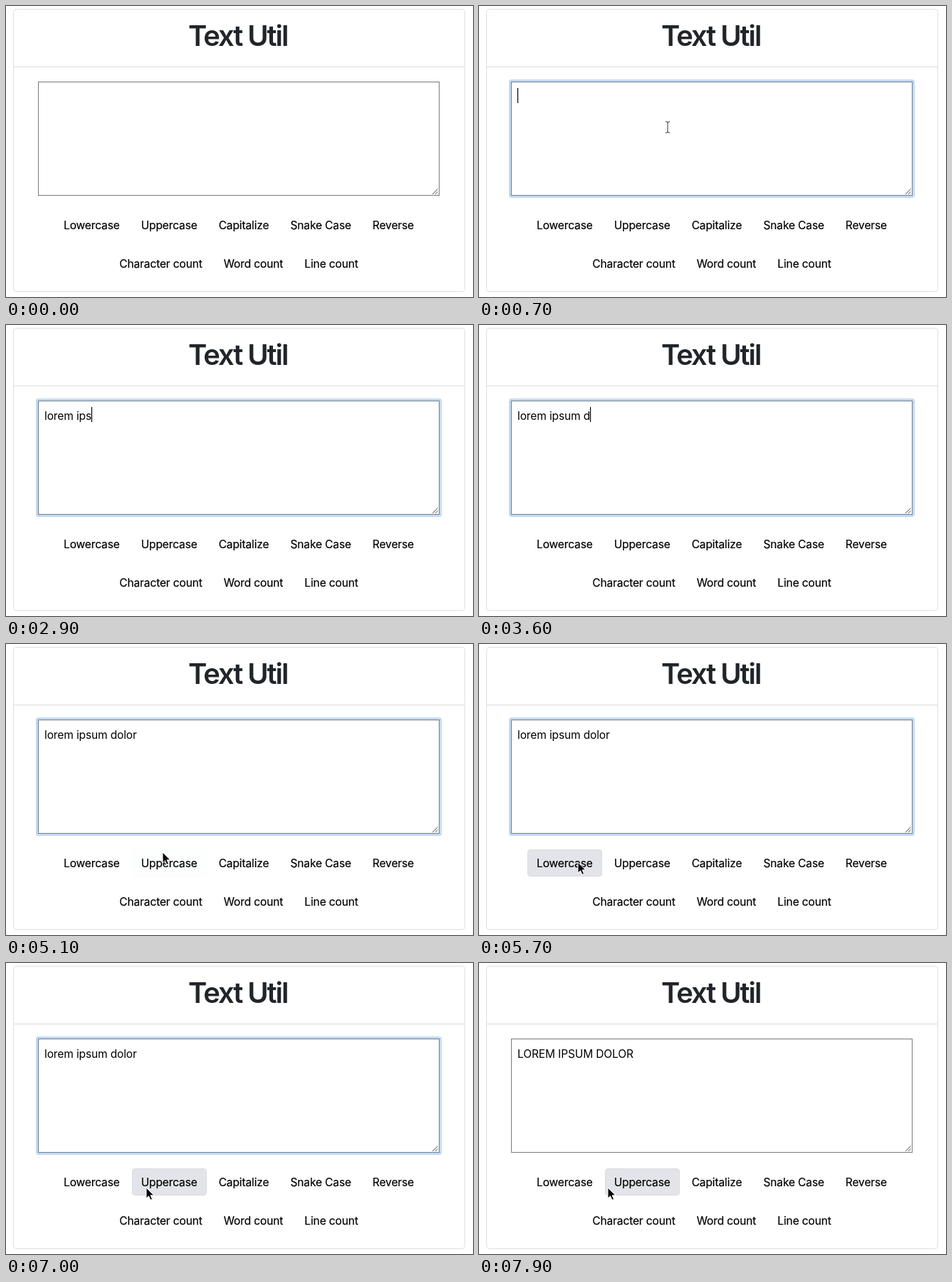
An HTML page for the animation above (8 s loop, 656x408 px).

```html
<!DOCTYPE html>
<html lang="en">
<head>
<meta charset="utf-8">
<title>Text Util</title>
<style>
html, body { margin: 0; width: 100%; height: 100%; overflow: hidden; background: #fff; }
svg { position: absolute; left: 0; top: 0; }
text, span { font: 15.5px Inter, Roboto, sans-serif; letter-spacing: -.12px; white-space: pre; color: #000; -webkit-text-stroke: .2px #000; }
.title { font-size: 40px; font-weight: 600; letter-spacing: -2.1px; fill: #212529; -webkit-text-stroke: 0; }
.rows { position: absolute; left: 0; top: 288px; width: 654px; }
.row { display: flex; justify-content: center; gap: 4px; margin-bottom: 16px; }
.row span { box-sizing: border-box; height: 38px; line-height: 37px; padding: 0 12px; border: 1px solid transparent; border-radius: 4px; }
</style>
</head>
<body>
<div class="rows">
  <div class="row"><span>Lowercase</span><span>Uppercase</span><span>Capitalize</span><span>Snake Case</span><span>Reverse</span></div>
  <div class="row"><span>Character count</span><span>Word count</span><span>Line count</span></div>
</div>
<svg width="656" height="408" viewBox="0 0 656 408" fill="none">
  <rect x="10.5" y="4.5" width="634" height="396" rx="4" stroke="#dfdfdf"/>
  <path d="M11 85.5H644" stroke="#dcdcdc"/>
  <text class="title" x="256" y="56">Text Util</text>
  <rect id="glow" x="43.5" y="104.5" width="567" height="163" rx="2" stroke="#c3d9f2" stroke-width="3"/>
  <rect id="area" x="45.5" y="106.5" width="563" height="159"/>
  <path d="M599 264L606.5 256.5M603 264L606.5 260.5" stroke="#555"/>
  <text id="typed" x="54" y="133" fill="#000"></text>
  <path id="caret" d="M0 115V136" stroke="#000" stroke-width="1.2"/>
  <path id="beam" d="M-3 -8Q0 -8 0 -6Q0 -8 3 -8M0 -6V6M-3 8Q0 8 0 6Q0 8 3 8" stroke="#333"/>
  <path id="arrow" d="M0 0V15L3.5 11.8L5.9 17.3L8.5 16.2L6.1 10.8H10.8Z" fill="#000" stroke="#fff"/>
</svg>
<script>
const $ = id => document.getElementById(id);
const LOOP = 8000, STEP = 100, FADE = 150;
const FOCUS = 700, TYPE = 1300, TYPED = 4200, CLICK = 7200;
const phrase = 'lorem ipsum dolor';

// time, letters typed
const typing = [[TYPE, 1], [1700, 4], [2000, 6], [2200, 7], [2700, 8], [3000, 10], [TYPED, phrase.length]];

// time, x, y
const pointer = [
  [100, 285, 396], [400, 265, 170], [4900, 265, 170], [5100, 220, 292], [5300, 139, 306],
  [6600, 139, 306], [7000, 197, 315], [7200, 203, 316], [7700, 203, 316], [7900, 181, 315]
];

const buttons = [...document.querySelectorAll('.row span')];
const clamp = v => Math.max(0, Math.min(1, v));
const show = (el, on) => el.setAttribute('visibility', on ? 'visible' : 'hidden');

// Straight-line blend between the key points around t.
function track(points, t) {
  const i = Math.max(1, points.findIndex(p => p[0] > t));
  const [from, to] = t >= points.at(-1)[0] ? points.slice(-2) : [points[i - 1], points[i]];
  const k = clamp((t - from[0]) / (to[0] - from[0]));
  return from.slice(1).map((v, j) => v + (to[j + 1] - v) * k);
}

const pointerShown = t => t >= 100 && t < TYPE || t >= 4900;

function hovered(box, t) {
  const [x, y] = track(pointer, t);
  return pointerShown(t) && x >= box.left && x < box.right && y >= box.top && y < box.bottom;
}

// Share of the last FADE ms spent over the button, which gives a linear fade.
function hoverLevel(box, t) {
  let hits = 0;
  for (let ago = 0; ago < FADE; ago += 10) hits += hovered(box, t - ago);
  return hits * 10 / FADE;
}

function draw(now) {
  const t = Math.floor(now % LOOP / STEP) * STEP;
  const focused = t >= FOCUS && t < CLICK;
  const count = t < TYPE ? 0 : Math.floor(track(typing, t)[0]);

  const typed = $('typed');
  typed.textContent = t < CLICK ? phrase.slice(0, count) : phrase.toUpperCase();
  show($('glow'), focused);
  $('area').setAttribute('stroke', focused ? '#737f8c' : '#7a7a7a');

  // The caret blinks only while no keys are pressed.
  const isTyping = t >= TYPE && t < TYPED;
  const idle = t - (t < TYPE ? FOCUS : TYPED);
  show($('caret'), focused && (isTyping || idle % 1000 < 500));
  const end = count ? typed.getComputedTextLength() : 0;
  $('caret').setAttribute('transform', `translate(${54.5 + end})`);

  for (const button of buttons) {
    const level = hoverLevel(button.getBoundingClientRect(), t);
    button.style.backgroundColor = `rgba(227, 228, 233, ${level})`;
    button.style.borderColor = `rgba(217, 219, 225, ${level})`;
  }

  const [x, y] = track(pointer, t);
  const inside = y > 106 && y < 266;
  for (const id of ['beam', 'arrow']) {
    show($(id), pointerShown(t) && inside === (id === 'beam'));
    $(id).setAttribute('transform', `translate(${x} ${y})`);
  }
  requestAnimationFrame(draw);
}
requestAnimationFrame(draw);
</script>
</body>
</html>
```
